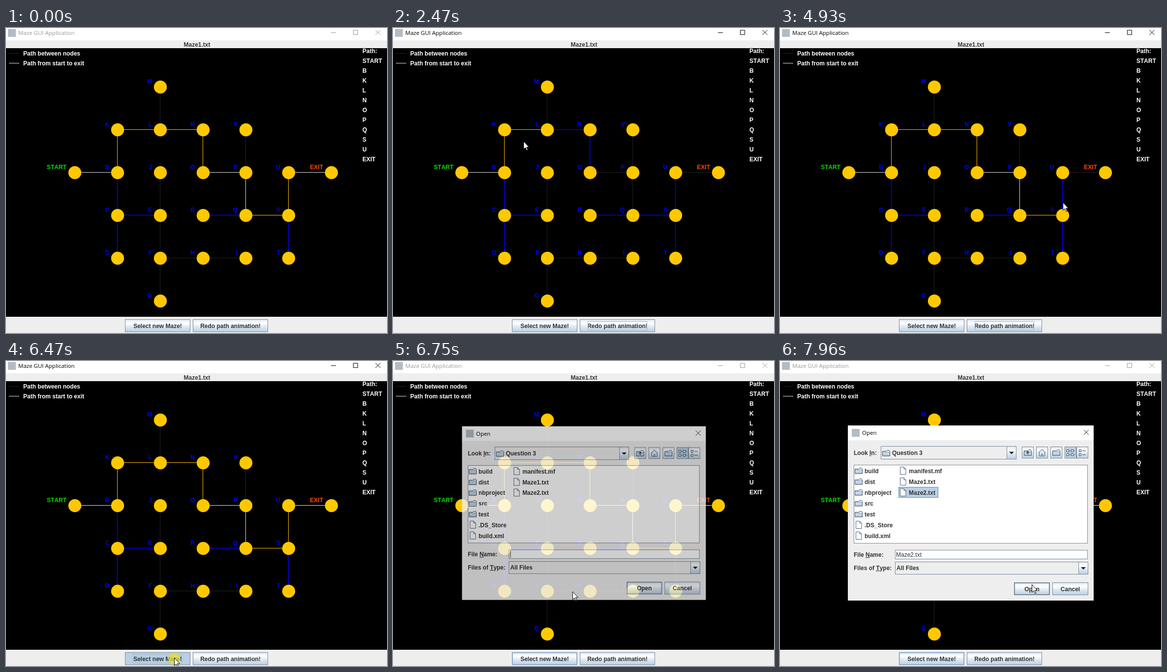
An HTML page that plays this animation: 775 by 620 pixels, repeating every 7.99 s.

```html
<!DOCTYPE html>
<html lang="en">
<head>
<meta charset="utf-8">
<title>Maze GUI Application</title>
<style>
@property --t { syntax: "<number>"; inherits: true; initial-value: 0; }
html, body { margin: 0; width: 775px; height: 620px; overflow: hidden; background: #eee; }
svg {
  display: block; --a: 0; --b: 9999;
  font: bold 12px "Liberation Sans", Arial, sans-serif; font-kerning: none;
  animation: clock 7.99s linear infinite;
}
text { white-space: pre; }
.ui { font: 11.5px "Open Sans", "Noto Sans", sans-serif; }
.mid { text-anchor: middle; }
.end { text-anchor: end; }
.plain { font-weight: normal; }
.key { text-decoration: underline; }
.line { fill: none; stroke-width: 1; }

/* visible from --a up to --b */
.span { opacity: calc(clamp(0, var(--t) - var(--a) + 1, 1) * clamp(0, var(--b) - var(--t), 1)); }
/* path edges: cleared at 1220 ms, lit again at --a */
.step { --lit: clamp(0, clamp(0, 1220 - var(--t), 1) + clamp(0, var(--t) - var(--a) + 1, 1), 1); }
.on { opacity: var(--lit); }
.off { opacity: calc(1 - var(--lit)); }

#title { color: #999; animation: title 7.99s step-end infinite; }
#dialog { transform-origin: 388px 309px; animation: dialog 7.99s linear infinite; }
#cursor { animation: move 7.99s linear infinite; }

@keyframes clock { from { --t: 0; } to { --t: 7990; } }
@keyframes title { 0% { color: #999; } 14.018% { color: #000; } 82.6%, 100% { color: #999; } }
@keyframes dialog {
  0%, 83.22% { opacity: 0; transform: scale(.95); animation-timing-function: cubic-bezier(.33, .66, .66, 1); }
  85.48%, 100% { opacity: 1; transform: none; }
}
@keyframes move {
  0%, 2.63% { transform: translate(709px, 498px); }
  6.26% { transform: translate(555px, 578px); }
  9.76% { transform: translate(376px, 600px); }
  11.39%, 18.27% { transform: translate(392px, 602px); }
  21.28% { transform: translate(330px, 470px); }
  24.41% { transform: translate(215px, 330px); }
  26.28% { transform: translate(194px, 285px); }
  28.29% { transform: translate(234px, 250px); }
  30.91% { transform: translate(265px, 230px); }
  34.42% { transform: translate(330px, 222px); }
  38.3% { transform: translate(375px, 233px); }
  43.18% { transform: translate(410px, 268px); }
  48.69% { transform: translate(455px, 304px); }
  53.19% { transform: translate(478px, 340px); }
  58.32% { transform: translate(525px, 371px); }
  61.7% { transform: translate(575px, 354px); }
  65.08% { transform: translate(606px, 400px); }
  68.21% { transform: translate(600px, 466px); }
  72.97%, 82.1% { transform: translate(342px, 603px); }
  84.48% { transform: translate(365px, 469px); }
  87.61% { transform: translate(330px, 340px); }
  90.86%, 92.87% { transform: translate(300px, 270px); }
  97% { transform: translate(522px, 440px); }
  98.9%, 100% { transform: translate(512px, 454px); }
}
</style>
</head>
<body>
<svg id="stage" width="775" height="620" viewBox="0 0 775 620"></svg>
<script>
const text = (x, y, s, fill = '#333', cls = '') =>
  `<text x="${x}" y="${y}" fill="${fill}" class="${cls}">${s}</text>`;
const rect = (x, y, w, h, fill, stroke = 'none') => stroke === 'none'
  ? `<rect x="${x}" y="${y}" width="${w}" height="${h}" fill="${fill}"/>`
  : `<rect x="${x + .5}" y="${y + .5}" width="${w - 1}" height="${h - 1}" fill="${fill}" stroke="${stroke}"/>`;
const path = (d, stroke, fill = 'none', width = 1) =>
  `<path d="${d}" stroke="${stroke}" fill="${fill}" stroke-width="${width}"/>`;
const at = (x, y, s) => `<g transform="translate(${x} ${y})">${s}</g>`;
const span = (a, b, s) => `<g class="span" style="--a:${a};--b:${b}">${s}</g>`;
const key = c => `<tspan class="key">${c}</tspan>`;

const EDGE = '#7a8a99', BLUE = '#b8cfe5', SHINE = 'url(#shine)';
const box = (x, y, w, h, fill = SHINE) => rect(x, y, w, h, fill, EDGE);
const button = (x, y, w, h, label) => box(x, y, w, h) + text(x + w / 2, y + 18, label, '#333', 'mid');
const glow = (x, y, w, h) => rect(x, y, w, h, 'none', '#6f93b8') + rect(x + 1, y + 1, w - 2, h - 2, 'none', '#a9c6e3');
const cross = (x, y, r, color) => path(`M${x - r} ${y - r}l${2 * r} ${2 * r}m0 ${-2 * r}l${-2 * r} ${2 * r}`, color);

function frame() {
  const controls = path('M661 9.5h10M706.5 4.5h9v9h-9z', 'currentColor') + cross(756.5, 9, 5, 'currentColor');
  return rect(0, 0, 775, 25, '#fff') + rect(0, 25, 775, 16, '#eee') +
    rect(0, 41, 775, 546, '#000') + rect(0, 587, 775, 33, '#eee') +
    rect(4, 2, 16, 16, '#b3bcc4') +
    `<g id="title">${text(25, 14, 'Maze GUI Application', 'currentColor', 'ui')}${controls}</g>` +
    text(388.5, 38, 'Maze1.txt', '#333', 'mid');
}

function maze() {
  const grid = '..M.... .KLNV.. sBJOPUx .CERQS. .DFHIT. ..G....'.split(' ');
  const names = { s: ['START', '#00dc00'], x: ['EXIT', '#ff4500'] };
  const pos = {};
  grid.forEach((row, r) => [...row].forEach((c, i) => {
    if (c !== '.') pos[c] = [140 + 87 * i, 120 + 87 * r];
  }));

  const line = ([a, b], color, width) => {
    const [x1, y1] = pos[a], [x2, y2] = pos[b];
    return path(`M${x1 - .5} ${y1 - .5}L${x2 - .5} ${y2 - .5}`, color, 'none', width);
  };
  const blue = e => line(e, '#00f', 1.5), dark = e => line(e, '#222', 1);
  const plain = 'BC CD CE RQ ST'.split(' ').map(blue).join('') +
    'LM JE EF FG FH HI VP'.split(' ').map(dark).join('');

  const route = 'sBKLNOPQSUx', pale = ['sB', 'OP', 'PQ', 'Ux'];
  const steps = [...route.slice(1)].map((c, i) => {
    const e = route[i] + c, light = pale.includes(e);
    return `<g class="step" style="--a:${1220 + 500 * i}">` +
      `<g class="off">${light ? dark(e) : blue(e)}</g>` +
      `<g class="on">${line(e, light ? '#e4e4e4' : '#ffc000', 1)}</g></g>`;
  }).join('');

  const nodes = Object.entries(pos).map(([c, [x, y]]) => {
    const [name, color] = names[c] || [c, '#00f'];
    return `<circle cx="${x}" cy="${y}" r="13.2" fill="#ffc800"/>` + text(x - 17, y - 7, name, color, 'end');
  }).join('');

  const list = ['Path:', ...route].map((c, i) =>
    text(725, 51 + 20 * i, names[c] ? names[c][0] : c, '#fff')).join('');
  const legend = path('M6 51.5h21', '#222') + path('M6 71.5h21', '#e4e4e4') +
    text(35, 56, 'Path between nodes', '#fff') + text(35, 76, 'Path from start to exit', '#fff');
  return plain + steps + nodes + list + legend;
}

function buttons() {
  const press = (x, w, label) => box(x, 592, w, 26, BLUE) + text(x + w / 2, 610, label, '#333', 'mid');
  const focus = (x, w) => rect(x, 596, w, 19, 'none', '#a3b8cc');
  const select = 'Select new Maze!', redo = 'Redo path animation!';
  return button(242, 592, 133, 26, select) + button(380, 592, 153, 26, redo) +
    span(860, 1500, glow(380, 592, 153, 26)) +
    span(1120, 1220, press(380, 153, redo)) +
    span(1120, 6470, focus(396, 121)) +
    span(5790, 7990, glow(242, 592, 133, 26)) +
    span(6470, 6540, press(242, 133, select) + focus(258, 101));
}

function dialog() {
  const folder = (x, y) => at(x, y, path('M.5 2.5h8l1.500-2h4l1.500 2v9.500h-15z', '#3f4f60', 'url(#fold)') + path('M1 4.500h14', '#7f97b0'));
  const file = (x, y) => at(x, y, path('M.5.5h7.500l4 4v11h-11.500z', '#4a6284', '#fff') + path('M8 .5v4h4', '#4a6284'));
  const drop = (x, y, h) => box(x, y, 20, h) + path(`M${x + 5} ${y + h / 2 - 2}h10l-5 5z`, 'none', '#222');
  const entry = (x, y, name, icon) =>
    (icon === folder ? folder(x, y - 6) : file(x + 2, y - 8)) + text(x + 20, y + 5, name);

  const rows = ['build', 'dist', 'nbproject', 'src', 'test', '.DS_Store', 'build.xml'];
  const left = rows.map((n, i) => entry(152, 223 + 22 * i, n, i < 5 ? folder : file)).join('');
  const right = ['manifest.mf', 'Maze1.txt', 'Maze2.txt'].map((n, i) => entry(242, 223 + 22 * i, n, file)).join('');

  const tools = [492, 521, 550].map(x => box(x, 174, 24, 24)).join('') +
    folder(496, 180) + path('M504 190v-6m-3 3l3-3l3 3', '#234', 'none', 1.3) +
    path('M525.500 186.500l7.500-7l7.500 7M527.500 186v7h11v-7', '#3f5a78', '#dbe8f4') + path('M531.500 193v-4h3v4', '#3f5a78') +
    folder(554, 180) +
    box(579, 174, 24, 24, BLUE) + box(603, 174, 24, 24) +
    [583, 592].map(x => [180, 188].map(y => rect(x, y, 5, 5, '#fff', '#345') + path(`M${x + 6} ${y + 2.5}h2`, '#345')).join('')).join('') +
    [180, 188].map(y => rect(608, y, 5, 5, '#fff', '#345') + path(`M615 ${y + 2.5}h7`, '#345')).join('');

  return '<g id="dialog">' +
    rect(138, 131, 500, 356, '#eee') + rect(138, 131, 500, 30, '#fff') +
    rect(146, 138, 16, 16, '#b3bcc4') + text(167, 150, 'Open', '#000', 'ui') + cross(623, 145, 5, '#222') +
    text(150, 191, `Look ${key('I')}n:`) + box(205, 173, 276, 27, '#eee') + drop(461, 173, 27) +
    folder(208, 181) + text(228, 191, 'Question 3') + tools +
    box(150, 211, 476, 160, '#fff') +
    span(7360, 7990, rect(241, 256, 81, 22, BLUE, '#6382bf')) + left + right +
    text(150, 398, `File ${key('N')}ame:`) + box(234, 384, 392, 19, '#fff') +
    span(6600, 7360, rect(237, 386, 1, 15, '#333')) +
    span(7360, 7990, text(236, 398, 'Maze2.txt', '#333', 'plain')) +
    text(150, 425, `Files of ${key('T')}ype:`) + box(234, 408, 393, 26, '#eee') + drop(607, 408, 26) +
    text(237, 425, 'All Files') +
    button(476, 450, 73, 26, 'Open') + rect(477, 451, 71, 24, 'none', EDGE) +
    button(554, 450, 73, 26, 'Cancel') + '</g>';
}

function cursor() {
  const halo = '<circle cy="2" r="12" fill="#e6de32" opacity=".75"/>';
  const clicks = [[1120, 1220], [6470, 6540], [7290, 7360]];
  return span(210, 7990, '<g id="cursor">' +
    clicks.map(([a, b]) => span(a, b, halo)).join('') +
    path('M.5 .5V16.500L4 13l2.600 5.800l2.400-1l-2.600-5.600h5z', '#000', '#fff') + '</g>');
}

const stop = (o, c) => `<stop offset="${o}" stop-color="${c}"/>`;
const fade = (id, stops) => `<linearGradient id="${id}" x2="0" y2="1">${stops}</linearGradient>`;
document.getElementById('stage').innerHTML =
  '<defs>' +
  fade('shine', stop(0, '#dde8f3') + stop(.3, '#fff') + stop(.6, '#dde8f3') + stop(1, BLUE)) +
  fade('fold', stop(0, '#f4f8fc') + stop(1, '#a9c3de')) +
  '</defs>' + frame() + maze() + buttons() + dialog() + cursor();
</script>
</body>
</html>
```
